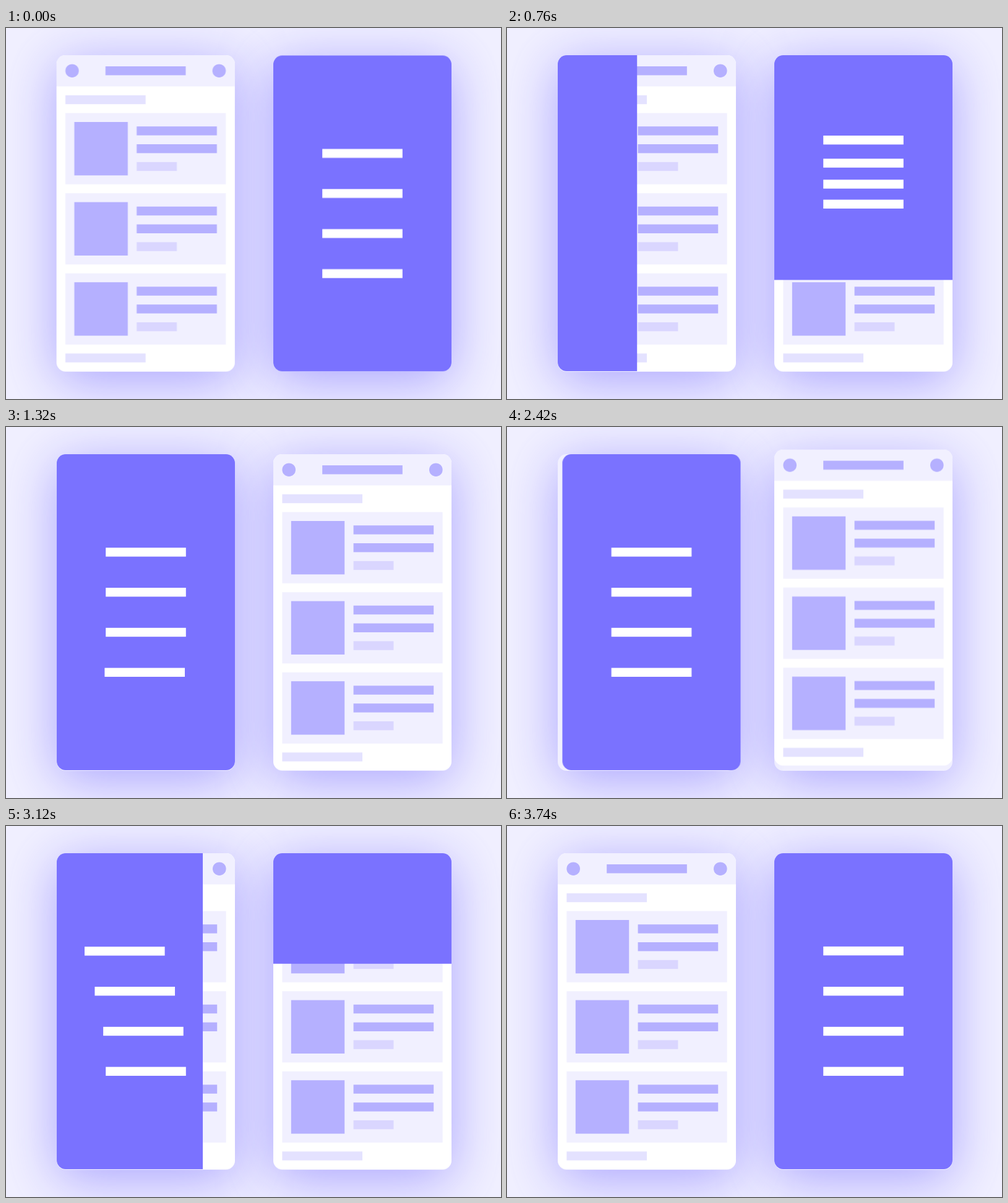
These frames come from a looping animation (800 px wide and 600 px high, 4800 ms). An HTML page:

```html
<!DOCTYPE html>
<html lang="en">
<head>
<meta charset="utf-8">
<title>Menu transitions</title>
<style>
  html, body { margin: 0; width: 100%; height: 100%; overflow: hidden; }
  body { background: #f1f0ff; }
  #stage { position: relative; width: 800px; height: 600px; overflow: hidden; background: #f1f0ff; }
  .shadow, .phone { position: absolute; top: 44.4px; width: 288px; height: 511.2px; border-radius: 14.4px; }
  .shadow { box-shadow: 0 14.4px 86.4px rgba(122, 112, 255, .6); }
  .phone { background: #fff; overflow: hidden; will-change: transform; }
  .left { left: 82px; }
  .right { left: 432px; }
  svg { display: block; width: 288px; height: 511.2px; }
  .pale { fill: #f1f0ff; }
  .section { fill: #e4e2ff; }
  .small { fill: #dad6ff; }
  .bar { fill: #b5b0ff; }
  .cover { fill: #7a72ff; }
  .line { fill: #fff; }
</style>
</head>
<body>
<div id="stage">
  <div class="shadow left"></div>
  <div class="shadow right"></div>
  <div class="phone left"></div>
  <div class="phone right"></div>
</div>
<script>
const LOOP = 4800, HALF = LOOP / 2;
const W = 288, H = 511.2, U = 14.4;

const rect = (cls, x, y, w, h = U) =>
  `<rect class="${cls}" x="${x}" y="${y}" width="${w}" height="${h}"/>`;
const dot = x => `<circle class="bar" cx="${x}" cy="25.2" r="10.8"/>`;

const card = y =>
  rect('pale', U, y, 259.2, 115.2) +
  rect('bar', 28.8, y + U, 86.4, 86.4) +
  rect('bar', 129.6, y + 21.6, 129.6) +
  rect('bar', 129.6, y + 50.4, 129.6) +
  rect('small', 129.6, y + 79.2, 64.8);

const page =
  rect('pale', 0, 0, W, 50.4) + dot(25.2) + dot(262.8) +
  rect('bar', 79.2, 18, 129.6) +
  rect('section', U, 64.8, 129.6) +
  [93.6, 223.2, 352.8].map(card).join('') +
  rect('section', U, 482.4, 129.6);

const menu = rect('cover', 0, 0, W, H) +
  [0, 1, 2, 3].map(i => rect('line', 79.2, 151.2 + i * 64.8, 129.6)).join('');

function makePhone(side, axis, dist, reversed) {
  const el = document.querySelector('.phone.' + side);
  el.innerHTML = `<svg viewBox="0 0 ${W} ${H}">${page}${menu}</svg>`;
  const lines = [...el.querySelectorAll('.line')];
  if (reversed) lines.reverse();
  return { el, axis, dist, lines, cover: el.querySelector('.cover') };
}

const left = makePhone('left', 'X', W, false);
const right = makePhone('right', 'Y', H, true);

const clamp = u => Math.min(1, Math.max(0, u));
const sine = u => (1 - Math.cos(Math.PI * clamp(u))) / 2;

// Smooth curve through [time, value] points, flat at both ends
function spline(pts) {
  const slope = pts.map((p, i) => {
    const a = pts[i - 1], b = pts[i + 1];
    return a && b ? (b[1] - a[1]) / (b[0] - a[0]) : 0;
  });
  return t => {
    if (t <= pts[0][0]) return pts[0][1];
    const i = pts.findIndex(p => p[0] > t);
    if (i < 0) return pts[pts.length - 1][1];
    const [t0, a] = pts[i - 1], [t1, b] = pts[i];
    const d = t1 - t0, u = (t - t0) / d, v = 1 - u;
    return a * v * v * (1 + 2 * u) + b * u * u * (3 - 2 * u) +
      d * u * v * (slope[i - 1] * v - slope[i] * u);
  };
}

const leave = spline([
  [630, 0], [660, .0395], [710, .153], [760, .286], [840, .538],
  [890, .694], [940, .826], [1010, .94], [1080, .986], [1130, 1]
]);

// Push away quickly, then come back with a slight overshoot
function nudge(t) {
  const push = 305, back = 300, size = 27.2;
  if (t < push) return size * (1 - Math.pow(1 - t / push, 4.5));
  const v = clamp((t - push) / back) - 1;
  return -size * (2.70158 * v ** 3 + 1.70158 * v ** 2);
}

const shift = (el, axis, d) => { el.style.transform = `translate${axis}(${d}px)`; };

function pose({ el, axis, dist, lines, cover }, t, opening) {
  shift(el, axis, opening ? -nudge(t) : nudge(t));
  const coverAt = opening ? sine((t - 462) / 643) - 1 : -leave(t);
  shift(cover, axis, coverAt * dist);
  lines.forEach((line, k) => {
    const at = opening ? sine((t - 575 - 66 * k) / 577) - 1 : -leave(t - 25 * (k + 1));
    shift(line, axis, at * dist);
  });
}

const start = performance.now();
function draw() {
  const t = (performance.now() - start) % LOOP;
  const first = t < HALF;
  pose(left, t % HALF, first);
  pose(right, t % HALF, !first);
  requestAnimationFrame(draw);
}
draw();
</script>
</body>
</html>
```
